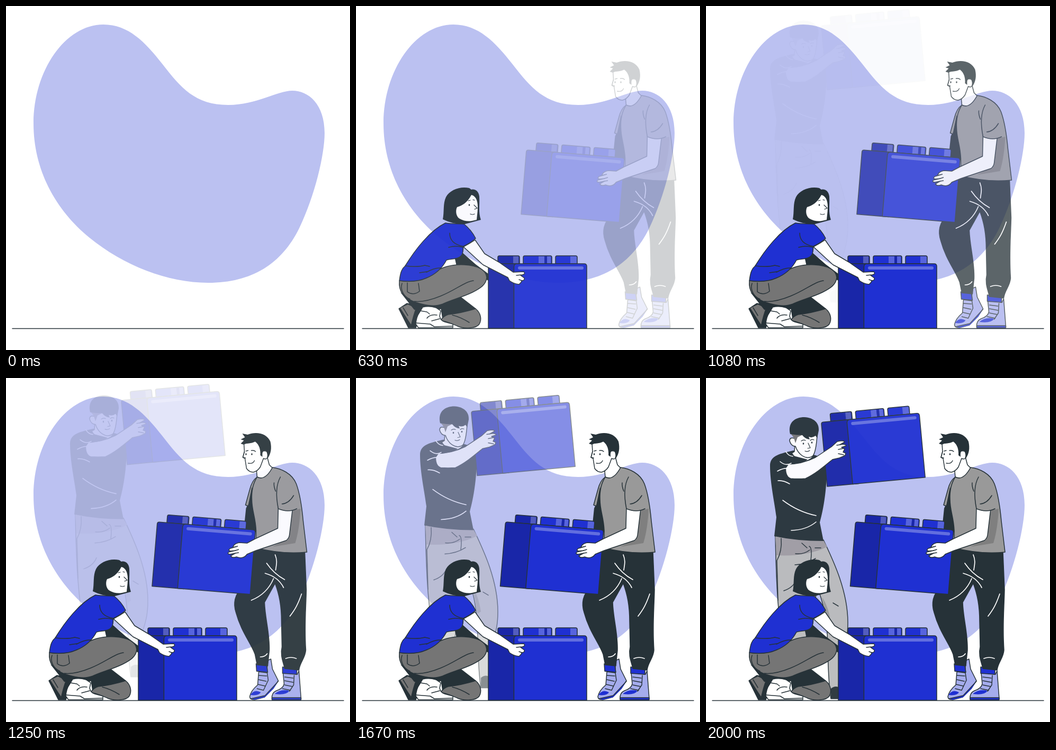
An HTML page with a canvas for the animation above (2040 ms loop, 650 px wide and 650 px high).

```html
<!DOCTYPE html>
<html lang="en">
<head>
<meta charset="utf-8">
<title>Building together</title>
<style>
html, body { margin: 0; width: 100%; height: 100%; overflow: hidden; background: #fff; }
canvas { display: block; width: 650px; height: 650px; }
</style>
</head>
<body>
<canvas id="stage"></canvas>
<script>
const SIZE = 650, LOOP = 2040, TICK = 1000 / 24, TRAVEL = 50;
const INK = '#263238', BLUE = '#1f30d2', NAVY = '#1926a8', PALE = '#a5aced';
const WHITE = '#fff', MID = '#999', DENIM = '#757575', LIGHT = '#babbbc';
const dpr = window.devicePixelRatio || 1;

const stage = document.getElementById('stage');
const sheet = document.createElement('canvas');
stage.width = stage.height = sheet.width = sheet.height = Math.round(SIZE * dpr);
const main = stage.getContext('2d'), g = sheet.getContext('2d');
for (const c of [main, g]) {
  c.lineJoin = c.lineCap = 'round';
}

function fill(color, d) {
  g.fillStyle = color;
  g.fill(new Path2D(d));
}
function line(d, color = INK, width = 1.5) {
  g.strokeStyle = color;
  g.lineWidth = width;
  g.stroke(new Path2D(d));
}
function shape(color, d) {
  fill(color, d);
  line(d);
}
function dot(x, y, rx = 1.3, ry = 1.8) {
  g.fillStyle = INK;
  g.beginPath();
  g.ellipse(x, y, rx, ry, 0, 0, 7);
  g.fill();
}

// Toy block, standing on its lower left corner
function stud(x, w, color, bands) {
  const d = `M${x} -122V-134Q${x} -137 ${x + 3} -137H${x + w - 3}Q${x + w} -137 ${x + w} -134V-122Z`;
  fill(color, d);
  for (const [from, width, tint] of bands) {
    g.fillStyle = tint;
    g.fillRect(x + from, -136, width, 14);
  }
  line(d);
}
function block(x, y, degrees) {
  const shine = 'rgba(255,255,255,.25)';
  g.save();
  g.translate(x, y);
  g.rotate(degrees * Math.PI / 180);
  stud(18, 41, NAVY, [[29, 10, shine]]);
  stud(66, 54, BLUE, [[29, 11, shine], [40, 5, NAVY], [45, 7, shine]]);
  stud(127, 41, BLUE, [[28, 12, shine]]);
  shape(NAVY, 'M0 0V-118Q0 -122 4 -122H60V0Z');
  shape(BLUE, 'M48.4 0V-116Q48.4 -122 54.4 -122H181Q186 -122 186 -117V0Z');
  line('M59 -114H177', '#626edf', 6);
  g.restore();
}

function woman() {
  block(250, 609, 0);
  // far leg and shoe
  fill(INK, 'M187 478L201 466L226 488L250 506V519L226 505L190 492Z');
  shape(INK, 'M160 566L195 548L226 572L200 600L165 598Z');
  shape(DENIM, 'M174 583Q200 580 226 572C236 580 238 592 233 601C228 609 205 611 192 605C180 600 172 596 160 594Q165 586 174 583Z');
  line('M182 584Q198 588 214 598');
  shape(INK, 'M81 572L96 562L118 566L124 575L113 608H99Z');
  fill(DENIM, 'M83 571L98 564L113 571Q108 584 104 602Z');
  line('M89 570L98 585M83 571L103 602');
  fill(INK, 'M84 541L118 558L164 553L180 562L150 578L110 574Z');
  // white shoe
  shape(WHITE, 'M113 601Q114 587 120 579L126 569Q138 566 151 570L160 576L158 586Q160 595 168 597L183 601V608H118Z');
  line('M114 599L140 601L148 606L182 605M122 576L134 578L139 582M134 590Q140 582 153 584M143 595L158 591');
  // thigh
  shape(DENIM, 'M82 519C105 522 130 518 147 504C164 492 185 488 205 489C230 490 246 499 247 513C246 526 236 533 220 541C199 551 178 556 164 563C148 570 124 564 110 559C91 551 80 541 82 519Z');
  line('M222 519C205 521 188 537 160 548C143 555 127 560 110 558M87 524C83 536 90 549 102 554M97 523L97 540Q108 548 120 539L118 524');
  // shirt
  shape(BLUE, 'M169 410C140 424 112 460 93 491C87 496 84 502 82 519C104 522 122 519 133 514C148 508 161 499 171 480C182 477 197 479 201 468C203 463 202 458 203 454Q216 448 226 439Q218 423 204 412C194 411 180 412 169 410Z');
  line('M177 429C177 443 186 451 202 454M175 456Q189 452 202 456M93 491Q116 494 130 490L139 492M120 504L134 502M133 503Q149 494 161 495');
  // near arm
  shape(WHITE, 'M225 442L243 468L270 484L297 503L317 502Q320 505 317 507L311 509L318 514Q319 519 313 519L312 522L308 526Q298 525 290 519L287 513L240 489L203 455Q215 449 225 442Z');
  line('M303 509L312 508M308 517L314 519');
  // head
  fill(INK, 'M164 403C167 389 164 373 170 361C177 347 198 340 214 344L218 347C225 345 232 350 233 360C234 376 231 390 236 404L206 412Q184 413 164 403Z');
  fill(WHITE, 'M218 357C210 372 201 377 191 380C187 388 190 399 196 402Q207 408 219 406L228 404C229 394 230 388 230 379C230 369 227 359 218 357Z');
  line('M223 376L229 382L224 384M216 393Q220 395 224 393', INK, 1.2);
  line('M212 368L216 367M221 366L224 367', INK, 1.2);
  dot(214, 376);
}

function boots() {
  shape(PALE, 'M490 534L497 531L500 550L511 572L501 587L485 603L466 608Q457 608 457 602Q459 591 472 580L474 555L490 557Z');
  fill(BLUE, 'M458 599Q466 587 478 594Q474 601 458 599ZM511 573L486 600L460 606L466 608L486 603L502 587Z');
  line('M511 573L486 600L459 606');
  shape(BLUE, 'M469 540L489 543L491 556L470 554Z');
  line('M474 562L489 563M474 570L488 573M473 579L486 582M471 587L483 590M490 557L492 571L483 590');
  shape(PALE, 'M520 557L547 560L550 553L554 606H499Q498 595 507 591Q520 587 522 578Z');
  fill(BLUE, 'M499 604H554V609H499ZM504 597Q516 587 532 591Q526 600 504 597Z');
  line('M499 604H554V608H499Z');
  shape(BLUE, 'M519 546L546 549V560L519 558Z');
  line('M523 565L539 567M523 572L539 575M523 580L538 583M519 587L534 590M541 562L540 580L532 592');
}

function carrier() {
  boots();
  // trousers
  shape(INK, 'M470 316L458 330L445 395C427 408 426 428 431 443C441 480 459 500 467 522L471 542L491 544Q492 533 494 515C495 482 486 455 485 424L505 388C513 410 517 430 517 460L518 508C514 525 521 538 523 549L550 552C552 536 562 530 563 514C560 468 563 440 564 400L561 328Z');
  line('M505 334C510 346 507 354 506 363M489 350C500 366 510 374 523 381M486 369C504 374 515 384 521 396M502 379C494 398 480 412 460 420M555 408C548 428 543 437 533 450M477 527Q486 527 490 521M525 530Q535 526 545 530', WHITE, 1.7);
  // far arm
  fill(INK, 'M459 205L455 236L450 246L446 285L470 292L472 236Z');
  shape(MID, 'M471 187Q461 194 457 211L449 240L454 242L461 220Z');
  fill(INK, 'M461 206L455 236L462 240L465 222Z');
  // head and neck
  shape(WHITE, 'M470 177L471 187Q486 198 500 170L494 164L490 149L476 150Z');
  shape(WHITE, 'M446 124L447 139L444 150L448 152L451 171Q456 178 464 178Q472 176 477 168L483 152Q491 156 491 145Q491 136 482 138L474 118Z');
  fill(INK, 'M443 105L453 107C470 100 490 105 496 120C499 133 497 143 491 152Q492 137 485 137Q480 138 481 149L477 146Q478 128 467 120C460 125 451 122 446 126L440 124L446 118L440 116L448 112Z');
  line('M447 139L444 150L449 151M454 161Q463 163 466 156M450 138L454 137M460 137Q465 136 468 139', INK, 1.3);
  dot(450, 144);
  dot(461, 144);
  // shirt
  shape(MID, 'M471 187Q486 195 500 169C516 171 537 180 545 200C552 219 556 248 558 270L565 329C535 332 500 329 469 321L469 288C468 263 461 250 461 230C460 210 464 198 471 187Z');
  fill('#7f7f7f', 'M553 247Q551 286 543 312L500 319L528 304L539 250Z');
  block(272.5, 393.5, 4.7);
  shape(WHITE, 'M511 244L510 284L467 304L452 312L437 311Q427 313 425 320L434 318L420 322Q415 326 421 327L430 326L417 329Q414 333 420 333L430 331L421 336Q424 341 432 338Q445 343 452 333L469 326L526 307Q531 303 532 297L538 247Z');
  line('M430 326L436 324M430 331L436 330');
  fill(MID, 'M515 187C507 201 506 222 511 247Q530 255 546 247L552 240L542 200Z');
  line('M515 187C507 201 506 222 511 247Q530 255 546 247M503 198Q502 204 506 214M518 238Q531 237 540 222');
}

function lifter() {
  // trousers
  shape(LIGHT, 'M131 298L222 306C238 340 268 400 268 462C268 485 265 500 258 520C251 548 250 580 250 606H236C230 570 231 530 229 482C226 440 218 415 211 398L190 484L186 520H148C136 450 133 400 131 298Z');
  fill('#a09da2', 'M131 300L222 307L229 319Q190 338 133 335Z');
  fill(MID, 'M219 414Q231 430 236 462L229 466Q226 438 219 414Z');
  line('M142 303Q144 327 134 345M134 345L136 420M181 312L191 321M195 318Q201 320 198 345M206 321H217M168 353Q190 352 207 341M169 332Q184 334 196 325M147 402Q165 396 171 381M240 425L250 431');
  fill(INK, 'M236 587Q243 581 250 584V606H236Z');
  // shirt
  fill(INK, 'M165 137C142 143 121 145 121 166C121 198 130 238 133 263L129 299Q172 308 222 308L215 273C222 248 230 205 228 152L203 145Z');
  line('M145 231Q174 253 208 260M161 288Q190 287 208 272', WHITE, 1.6);
  // neck and head
  shape(WHITE, 'M168 124L167 139L162 142Q171 157 188 157Q200 154 203 146L197 142Z');
  shape(WHITE, 'M165 106L167 114Q158 111 158 119Q161 129 169 129Q173 141 182 147Q193 154 202 147Q208 139 210 108Z');
  fill(DENIM, 'M160 105L181 108L173 112L169 123L166 113Z');
  fill(INK, 'M159 106C154 84 168 74 186 74C204 75 214 85 213 99L210 114L207 109Q201 114 194 111L196 116Q187 115 182 108Q171 108 159 106Z');
  line('M193 123L197 132L192 133M187 138Q192 140 196 137M180 119Q184 116 188 118M197 118Q200 115 204 117', INK, 1.2);
  dot(184, 124);
  dot(200, 122);
  block(229, 205, -5.3);
  // near arm
  shape(WHITE, 'M152 163C149 172 150 187 160 190Q174 191 188 190C207 181 222 168 239 154L252 151Q258 149 263 146L264 142L259 140L262 134L256 131L265 128Q263 124 253 126L262 121Q261 117 248 120L237 130L207 150Q181 163 152 163Z');
  line('M250 135L260 133M250 143L260 145M247 127L254 126');
  fill(INK, 'M150 143L192 154Q178 164 157 162L148 175L140 160Z');
  line('M151 139Q155 147 164 148M140 158Q151 167 161 161M135 176Q151 167 162 173M136 194Q146 193 158 200', WHITE, 1.6);
}

// Smooth progress through a few [time, value] points
function progress(keys, t) {
  const last = keys.length - 1;
  if (t <= keys[0][0]) return 0;
  if (t >= keys[last][0]) return keys[last][1];
  const slope = i => i === 0 || i === last ? 0 :
    (keys[i + 1][1] - keys[i - 1][1]) / (keys[i + 1][0] - keys[i - 1][0]);
  const i = keys.findIndex(k => k[0] > t) - 1;
  const [t0, a] = keys[i], [t1, b] = keys[i + 1];
  const span = t1 - t0, u = (t - t0) / span, v = 1 - u;
  const value = a * v * v * (1 + 2 * u) + b * u * u * (3 - 2 * u) +
    span * u * v * (slope(i) * v - slope(i + 1) * u);
  return Math.min(1, Math.max(0, value));
}

const cast = [
  { draw: lifter, keys: [[1000, 0], [1083, .02], [1417, .25], [1667, .54], [2000, .95], [2060, 1]],
    move: p => [0, 2.5 - TRAVEL * (1 - p)] },
  { draw: carrier, keys: [[340, 0], [625, .21], [1083, .75], [1250, .93], [1417, .99], [1520, 1]],
    move: p => [TRAVEL * (1 - p), 0] },
  { draw: woman, keys: [[95, 0], [333, .43], [625, .935], [760, 1]],
    move: () => [0, 0] }
];

const blob = new Path2D('M52 222C52 122 112 35 184 35C231 35 263 68 295 109C330 154 357 187 420 187C473 187 513 160 541 160C572 160 602 186 602 240C602 280 584 358 554 420C521 487 465 523 382 523C305 523 222 490 158 438C92 384 52 308 52 222Z');

function render(ms) {
  const t = Math.floor((ms % LOOP) / TICK + .13) * TICK;
  main.setTransform(dpr, 0, 0, dpr, 0, 0);
  main.globalAlpha = 1;
  main.fillStyle = WHITE;
  main.fillRect(0, 0, SIZE, SIZE);
  main.fillStyle = '#bbc1f1';
  main.fill(blob);
  main.strokeStyle = INK;
  main.lineWidth = 1.5;
  main.beginPath();
  main.moveTo(12, 609.4);
  main.lineTo(638, 609.4);
  main.stroke();
  for (const { draw, keys, move } of cast) {
    const p = progress(keys, t);
    if (!p) continue;
    g.setTransform(dpr, 0, 0, dpr, 0, 0);
    g.clearRect(0, 0, SIZE, SIZE);
    g.translate(...move(p));
    draw();
    main.globalAlpha = p;
    main.drawImage(sheet, 0, 0, SIZE, SIZE);
  }
}

const start = performance.now();
function loop() {
  render(performance.now() - start);
  requestAnimationFrame(loop);
}
loop();
</script>
</body>
</html>
```
